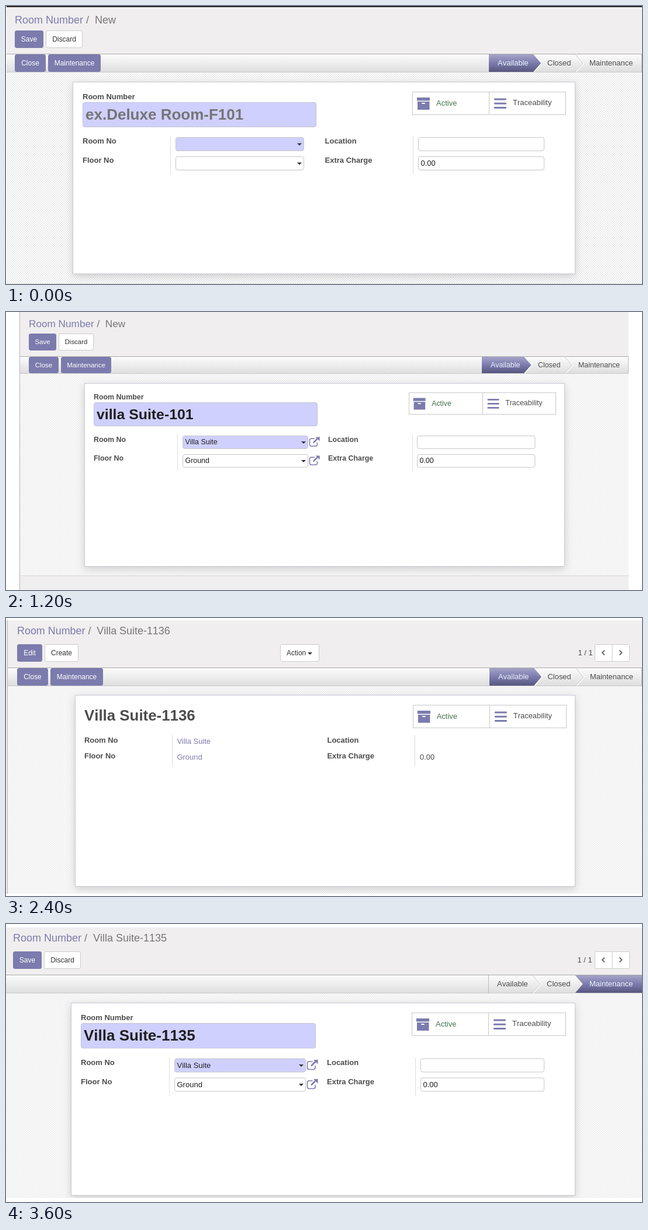
An HTML page for the animation above (4.8 s loop, 1088 by 477 pixels).

```html
<!DOCTYPE html>
<html lang="en">
<head>
<meta charset="utf-8">
<title>Room form</title>
<style>
  html, body { margin: 0; width: 100%; height: 100%; overflow: hidden; background: #fff; }
  svg { display: block; width: 1088px; height: 477px; font-family: "Liberation Sans", Arial, sans-serif; }
  text { white-space: pre; font-kerning: none; }
</style>
</head>
<body>
<svg id="stage" viewBox="0 0 1088 477">
  <defs>
    <linearGradient id="bar" x2="0" y2="1">
      <stop stop-color="#fcfcfc"/><stop offset="1" stop-color="#dedede"/>
    </linearGradient>
    <linearGradient id="active" x2="0" y2="1">
      <stop stop-color="#a5a4c8"/><stop offset=".5" stop-color="#7c7bad"/><stop offset="1" stop-color="#57567f"/>
    </linearGradient>
    <pattern id="weave" width="4" height="4" patternUnits="userSpaceOnUse">
      <path fill="#fff" d="M0 0h4v4H0z"/><path fill="#e9e9e9" d="M0 0h2v2H0zM2 2h2v2H2z"/>
    </pattern>
    <pattern id="softWeave" width="3.9" height="3.9" patternUnits="userSpaceOnUse">
      <path fill="#fcfcfc" d="M0 0h4v4H0z"/><path fill="#eee" d="M0 0h2v2H0zM2 2h2v2H2z"/>
    </pattern>
    <filter id="shadow" x="-10%" y="-10%" width="120%" height="125%">
      <feDropShadow dx="0" dy="4" stdDeviation="7" flood-color="#000" flood-opacity=".16"/>
    </filter>
  </defs>
</svg>
<script>
const HOLD = 1200;
const PURPLE = '#7c7bad', LILAC = '#d0d0ff', HEAD = '#f0eeee', LINE = '#c8c8d3', GREY = '#4c4c4c', INK = '#1f1f1f';

// Boxes are [left, top, right, bottom].
const scenes = [
  {
    k: 1, area: [1, 2, 1088, 477], topLine: true, weave: 'weave',
    crumb: [15, 30, 'New'], rowY: [42, 72],
    buttons: [[15, 64, 'Save', 1], [68, 131, 'Discard']],
    bar: [82, 113], actions: [[15, 68, 'Close'], [72, 162, 'Maintenance']],
    steps: { x: [826, 902, 974], text: [841, 926, 998], base: 102, on: 0 },
    bottom: 476, sheet: [114, 130, 974, 460],
    label: [131, 160], titleBox: [131, 165, 531, 208],
    title: [136, 195, 'ex.Deluxe Room-F101', '#757575'],
    stat: [695, 147, 958, 187, 826],
    rows: [236, 269], split: [223, 289], fieldY: [225, 258],
    left: [131, 281, 290, 510], right: [545.5, 696, 705, 921],
    values: ['', '']
  },
  {
    k: .955, area: [23, 0, 1065, 477], edge: 23, weave: 'softWeave',
    crumb: [39, 26, 'New'], rowY: [37, 66],
    buttons: [[39, 86, 'Save', 1], [90, 150, 'Discard']],
    bar: [76, 105], actions: [[39, 90, 'Close'], [94, 180, 'Maintenance']],
    steps: { x: [814, 886, 956], text: [829, 910, 979], base: 95, on: 0 },
    bottom: 452, sheet: [134, 122, 956, 437],
    label: [150, 150], titleBox: [150, 155, 533, 196],
    title: [155, 184, 'villa Suite-101', INK],
    stat: [689, 138, 941, 176, 815],
    rows: [223, 255], split: [210, 273], fieldY: [212, 244],
    left: [150, 293, 302, 517], right: [551, 695, 703, 905.5],
    values: ['Villa Suite', 'Ground']
  },
  {
    k: .995, area: [0, 4, 1088, 473], edge: 2, weave: 'softWeave',
    crumb: [19, 28, 'Villa Suite-1136'], rowY: [45, 75],
    buttons: [[19, 62, 'Edit', 1], [66, 124, 'Create']], menu: [469, 536],
    pager: [978.5, 1007, 1067],
    bar: [85, 116], actions: [[19, 72, 'Close'], [76, 166, 'Maintenance']],
    steps: { x: [827, 903, 975], text: [842, 926.5, 999], base: 104.5, on: 0 },
    sheet: [118, 132, 974, 461],
    title: [134, 176, 'Villa Suite-1136', GREY],
    stat: [696, 149, 959, 189, 827],
    rows: [214, 241], split: [201, 255],
    left: [134, 284, 292.5], right: [549.5, 699, 708],
    values: ['Villa Suite', 'Ground']
  },
  {
    k: 1, area: [0, 6, 1088, 470], weave: 'softWeave',
    crumb: [12, 30, 'Villa Suite-1135'], rowY: [47, 77],
    buttons: [[12, 61, 'Save', 1], [65, 128, 'Discard']],
    pager: [977.5, 1007, 1067],
    bar: [87, 118], actions: [],
    steps: { x: [825, 901, 974], text: [840, 925, 998], base: 107, on: 2 },
    sheet: [111, 135, 974, 466],
    label: [128, 165], titleBox: [128, 170, 530, 213.5],
    title: [133, 200, 'Villa Suite-1135', INK],
    stat: [694, 152, 958, 192, 825],
    rows: [242, 275], split: [229, 295], fieldY: [230.5, 263.5],
    left: [128, 279, 288, 513], right: [549, 700, 709, 921],
    values: ['Villa Suite', 'Ground']
  }
];

const fill = (x, y, r, b, color, extra = '') =>
  `<rect x="${x}" y="${y}" width="${r - x}" height="${b - y}" fill="${color}" ${extra}/>`;
const frame = (x, y, r, b, color, stroke, radius = 0, extra = '') =>
  fill(x + .5, y + .5, r - .5, b - .5, color, `stroke="${stroke}" rx="${radius}" ${extra}`);
const path = (d, color, stroke = 'none', width = 1) =>
  `<path d="${d}" fill="${color}" stroke="${stroke}" stroke-width="${width}"/>`;
const text = (x, y, s, size, color, extra = '') =>
  `<text x="${x}" y="${y}" font-size="${size}" fill="${color}" ${extra}>${s}</text>`;
const BOLD = 'font-weight="700"', MID = 'text-anchor="middle"';
const caret = (x, y) => path(`M${x} ${y}h8l-4 4z`, '#333');

function button(x, r, y, b, label, primary, k) {
  return frame(x, y, r, b, primary ? PURPLE : '#fff', primary ? PURPLE : '#ccc', 2.5) +
    text((x + r) / 2, y + 19 * k, label, 12 * k, primary ? '#fff' : '#333', MID);
}

function header({ k, area, crumb, rowY, buttons, menu, pager, bar }) {
  const [x, y, title] = crumb, [t, b] = rowY;
  let out = fill(area[0], area[1], area[2], bar[0], HEAD) +
    text(x, y, 'Room Number', 18 * k, PURPLE) +
    text(x + 122 * k, y, '/', 18 * k, '#777') +
    text(x + 137 * k, y, title, 18 * k, '#777');
  for (const [l, r, s, main] of buttons) out += button(l, r, t, b, s, main, k);
  if (menu) {
    out += button(menu[0], menu[1], t, b, '', 0, k) +
      text(menu[0] + 11, t + 19, 'Action', 12 * k, '#333') + caret(menu[1] - 20, t + 14);
  }
  if (pager) {
    const [px, l, r] = pager, m = (l + r) / 2, c = (t + b) / 2 - .5;
    const arrow = (ax, d) => path(`M${ax - 2 * d} ${c - 4}l${4 * d} 4l${-4 * d} 4`, 'none', '#6c6c6c', 2);
    out += text(px, t + 18.5, '1 / 1', 13 * k, GREY) +
      frame(l, t, r, b, '#fff', '#ccc', 1) + fill(m - .5, t, m + .5, b, '#ccc') +
      arrow(l + 15, -1) + arrow(m + 14.5, 1);
  }
  return out;
}

function statusBar({ k, area, bar, actions, steps }) {
  const [t, b] = bar, [x0, , x1] = area, tip = 13 * k, h = b - t - 1, top = t + 1;
  const [a, c, e] = steps.x;
  let out = fill(x0, t, x1, top, '#aaa') + fill(x0, top, x1, b, 'url(#bar)') +
    fill(x0, b, x1, b + 1, '#cacaca');
  for (const [l, r, s] of actions) out += button(l, r, top, b, s, 1, k);
  const edge = x => `M${x} ${top}l${tip} ${h / 2}l${-tip} ${h / 2}`;
  for (const x of [c, e]) out += path(edge(x + 1), 'none', '#fff', 2) + path(edge(x), 'none', '#c4c4c4');
  out += fill(a, top, a + 1, b, '#bbb') + fill(x1 - 1, top, x1, b, '#bbb');
  out += steps.on
    ? path(`${edge(e)}H${x1}V${top}z`, 'url(#active)')
    : path(`M${a} ${top}H${c}l${tip} ${h / 2}L${c} ${b}H${a}z`, 'url(#active)');
  ['Available', 'Closed', 'Maintenance'].forEach((s, i) => {
    out += text(steps.text[i], steps.base, s, 13 * k, i === steps.on ? '#eef6ff' : GREY);
  });
  return out;
}

function statButtons({ k, stat }) {
  const [l, t, r, b, m] = stat;
  const at = (x, y, s) => `<g transform="translate(${x} ${y}) scale(${k})">${s}</g>`;
  const box = path('M0 0h22v5.5H0zM1 7h20.5v14H1z', PURPLE) + fill(8, 9, 14, 11, '#fff', 'rx="1"');
  const lines = [0, 7.3, 14.6].map(y => fill(0, y, 21, y + 3, PURPLE, 'rx="1"')).join('');
  return frame(l, t, r, b, '#fff', '#c8c8c8') + fill(m, t, m + 1, b, '#c8c8c8') +
    at(l + 8 * k, t + 10 * k, box) + at(m + 9 * k, t + 11.5 * k, lines) +
    text(l + 41 * k, t + 24 * k, 'Active', 13 * k, '#44704e') +
    text(m + 41 * k, t + 23 * k, 'Traceability', 13 * k, GREY);
}

function openIcon(x, y, k) {
  return `<g transform="translate(${x} ${y}) scale(${k})">` +
    path('M10 4H4Q1 4 1 7V14.5Q1 17.5 4 17.5H11.5Q14.5 17.5 14.5 14.5V11', 'none', PURPLE, 1.6) +
    path('M7.5 11.5L15 4', 'none', PURPLE, 2.6) + path('M11.5 1H19V8.5z', PURPLE) + '</g>';
}

function field(x, y, r, value, color, k) {
  return frame(x, y, r, y + 24 * k, color, '#c6c6c6', 3.5) + text(x + 4.5, y + 16 * k, value, 13 * k, INK);
}

function form(s) {
  const { k, sheet, rows, split, fieldY, left, right, values } = s;
  const names = [['Room No', 'Floor No'], ['Location', 'Extra Charge']];
  let out = frame(...sheet, '#fff', LINE, 0, 'filter="url(#shadow)"') + statButtons(s);
  if (s.titleBox) {
    out += text(...s.label, 'Room Number', 13 * k, GREY, BOLD) + frame(...s.titleBox, LILAC, '#c3c3d6', 3.5);
  }
  const [tx, ty, title, color] = s.title;
  out += text(tx, ty, title, 26 * k, color, BOLD);
  [left, right].forEach(([lx, vx, fx, fr], col) => {
    out += fill(vx, split[0], vx + 1, split[1], '#ddd');
    rows.forEach((y, i) => {
      const value = col ? ['', '0.00'][i] : values[i];
      out += text(lx, y, names[col][i], 13 * k, GREY, BOLD);
      if (!fieldY) {
        out += text(fx, y + 2, value, 13 * k, col ? GREY : PURPLE);
        return;
      }
      const fy = fieldY[i];
      out += field(fx, fy, fr, value, !col && !i ? LILAC : '#fff', k);
      if (!col) out += caret(fr - 12, fy + 10.5 * k);
      if (!col && value) out += openIcon(fr + 1.5, fy + 1.5, k);
    });
  });
  return out;
}

function draw(s) {
  const [x, y, r, b] = s.area, end = s.bottom || b;
  let out = fill(0, 0, 1088, 477, '#fff') + fill(x, s.bar[1], r, end, `url(#${s.weave})`) +
    form(s) + header(s) + statusBar(s);
  if (s.bottom) out += fill(x, end, r, b, HEAD) + fill(x, end, r, end + 1, '#d8d8d8');
  else out += fill(0, b, 1088, 477, '#fff');
  if (s.topLine) out += fill(x, 0, r, 2, '#222');
  if (s.edge) out += fill(x, y, s.edge, b, HEAD) + fill(s.edge, y, s.edge + 1, b, '#b4b4b4');
  return out;
}

const stage = document.getElementById('stage');
const count = scenes.length;
scenes.forEach((s, i) => {
  const g = document.createElementNS('http://www.w3.org/2000/svg', 'g');
  g.innerHTML = draw(s);
  stage.append(g);
  const cut = 1 / count;
  g.animate([
    { opacity: 1, offset: 0 }, { opacity: 1, offset: cut },
    { opacity: 0, offset: cut }, { opacity: 0, offset: 1 }
  ], { duration: HOLD * count, delay: -((count - i) % count) * HOLD, iterations: Infinity });
});
</script>
</body>
</html>
```
